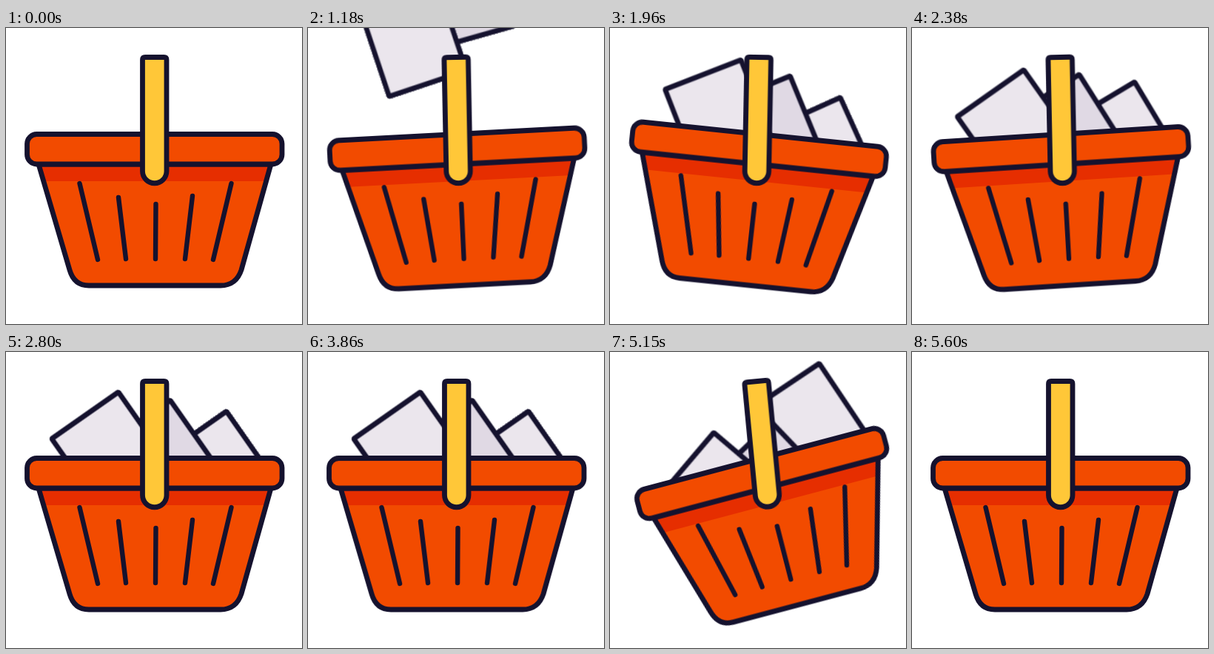
Write an HTML page without scripts that moves like this. It is 400 px wide and 400 px high and loops after 5.66 s.

```html
<!DOCTYPE html>
<html lang="en">
<head>
<meta charset="utf-8">
<title>Shopping basket</title>
<style>
  html, body { margin: 0; width: 100%; height: 100%; overflow: hidden; background: #fff; }
  svg { display: block; width: 100%; height: 100%; }

  .ink { stroke: #15122e; stroke-width: 6.8; stroke-linecap: round; stroke-linejoin: round; }
  .rib { stroke-width: 6.4; }
  .line { fill: none; }
  .orange { fill: #f24b00; }
  .shade { fill: #e62e00; }
  .yellow { fill: #ffc738; }
  .light { fill: #ebe6ed; }
  .dim { fill: #e0d9e4; }

  /* Every part plays forward, rests, then plays backward. */
  .swing, .tip, .sheet { animation: 2830ms linear -5175ms infinite alternate both; }

  .swing, .tip { animation-name: sway; }
  .swing {
    transform-origin: 201px 70px;
    --a: -5.6deg; --b: -4.3deg; --c: 1.1deg; --d: -1.15deg;
  }
  .tip {
    transform-origin: 201px 192px;
    --a: -9.7deg; --b: -6.8deg; --c: 4.9deg; --d: -2.5deg;
  }
  @keyframes sway {
    0%, 20.3% { transform: rotate(0deg); animation-timing-function: cubic-bezier(.5, 0, .5, 1); }
    33.4% { transform: rotate(var(--a)); animation-timing-function: cubic-bezier(.4, 0, .8, .7); }
    39.4% { transform: rotate(var(--b)); animation-timing-function: cubic-bezier(.3, .4, .6, 1); }
    51.4% { transform: rotate(var(--c)); animation-timing-function: cubic-bezier(.4, 0, .6, 1); }
    66.1% { transform: rotate(var(--d)); animation-timing-function: cubic-bezier(.4, 0, .6, 1); }
    81.8%, 100% { transform: rotate(0deg); }
  }

  /* Poses of a sheet: drop, sink, spring back, settle. */
  .sheet {
    --above: translateY(-257px) rotate(24deg);
    --fall: translateY(-43px) rotate(16deg);
    --land: translateY(35px) rotate(6deg);
    --deep: translateY(42px) rotate(.3deg);
    --rise: translateY(22px) rotate(-.5deg);
    --top: translateY(-10px) rotate(8deg);
    --lean: translateY(-2px) rotate(7.7deg);
    --back: translateY(-1px) rotate(3.5deg);
    --rest: translateY(0px) rotate(0deg);
  }
  .first { animation-name: first; }
  .second { animation-name: second; }
  .third { animation-name: third; transform-origin: 0 -30px; }

  @keyframes first {
    0%, 19.26% { transform: var(--above); }
    28.8% { transform: var(--fall); }
    31.98% { transform: var(--land); animation-timing-function: ease-out; }
    34.1% { transform: var(--deep); animation-timing-function: cubic-bezier(.4, .2, .8, .8); }
    39.4% { transform: var(--rise); animation-timing-function: cubic-bezier(.3, .4, .6, 1); }
    53.89% { transform: var(--top); animation-timing-function: ease-in-out; }
    60.6% { transform: var(--lean); animation-timing-function: ease-in; }
    66.96% { transform: var(--back); animation-timing-function: ease-out; }
    75.44%, 100% { transform: var(--rest); }
  }
  @keyframes second {
    0%, 22.44% { transform: var(--above); }
    31.98% { transform: var(--fall); }
    35.16% { transform: var(--land); animation-timing-function: ease-out; }
    37.28% { transform: var(--deep); animation-timing-function: cubic-bezier(.4, .2, .8, .8); }
    42.58% { transform: var(--rise); animation-timing-function: cubic-bezier(.3, .4, .6, 1); }
    57.07% { transform: var(--top); animation-timing-function: ease-in-out; }
    63.78% { transform: var(--lean); animation-timing-function: ease-in; }
    70.14% { transform: var(--back); animation-timing-function: ease-out; }
    78.62%, 100% { transform: var(--rest); }
  }
  @keyframes third {
    0%, 25.62% { transform: var(--above); }
    35.16% { transform: var(--fall); }
    38.34% { transform: var(--land); animation-timing-function: ease-out; }
    40.46% { transform: var(--deep); animation-timing-function: cubic-bezier(.4, .2, .8, .8); }
    45.76% { transform: var(--rise); animation-timing-function: cubic-bezier(.3, .4, .6, 1); }
    60.25% { transform: var(--top); animation-timing-function: ease-in-out; }
    66.96% { transform: var(--lean); animation-timing-function: ease-in; }
    73.32% { transform: var(--back); animation-timing-function: ease-out; }
    81.8%, 100% { transform: var(--rest); }
  }
</style>
</head>
<body>
<svg viewBox="0 0 400 400">
  <defs>
    <rect id="card" x="-55" y="-70" width="110" height="140" rx="1" transform="rotate(-35)"/>
    <path id="body" d="M44 184L86 327Q92 348 112 348H290Q311 348 318 327L358 184Z"/>
    <clipPath id="opening"><rect x="-200" y="-400" width="800" height="565"/></clipPath>
  </defs>

  <g class="swing">
    <g class="tip">
      <g class="ink" clip-path="url(#opening)">
        <g transform="translate(293 169)"><g class="sheet third"><use href="#card" class="light"/></g></g>
        <g transform="translate(217 154)"><g class="sheet second"><use href="#card" class="dim"/></g></g>
        <g transform="translate(147 143)"><g class="sheet first"><use href="#card" class="light"/></g></g>
      </g>

      <use href="#body" class="orange"/>
      <path class="shade" d="M44 184H358L351.6 207H50.8Z"/>
      <use href="#body" class="ink line"/>
      <path class="ink rib line" d="M99.5 210L124 313M152 229L162 312M202.5 238L202 312M252 227L242 312M304.500 210L280 313"/>
      <rect class="ink orange" x="28.5" y="143.5" width="344.500" height="40.500" rx="13"/>
    </g>
    <path class="ink yellow" d="M188 39.500H213.500Q217 39.500 217 43V193.500A16.250 16.250 0 0 1 184.500 193.500V43Q184.500 39.500 188 39.500Z"/>
  </g>
</svg>
</body>
</html>
```
